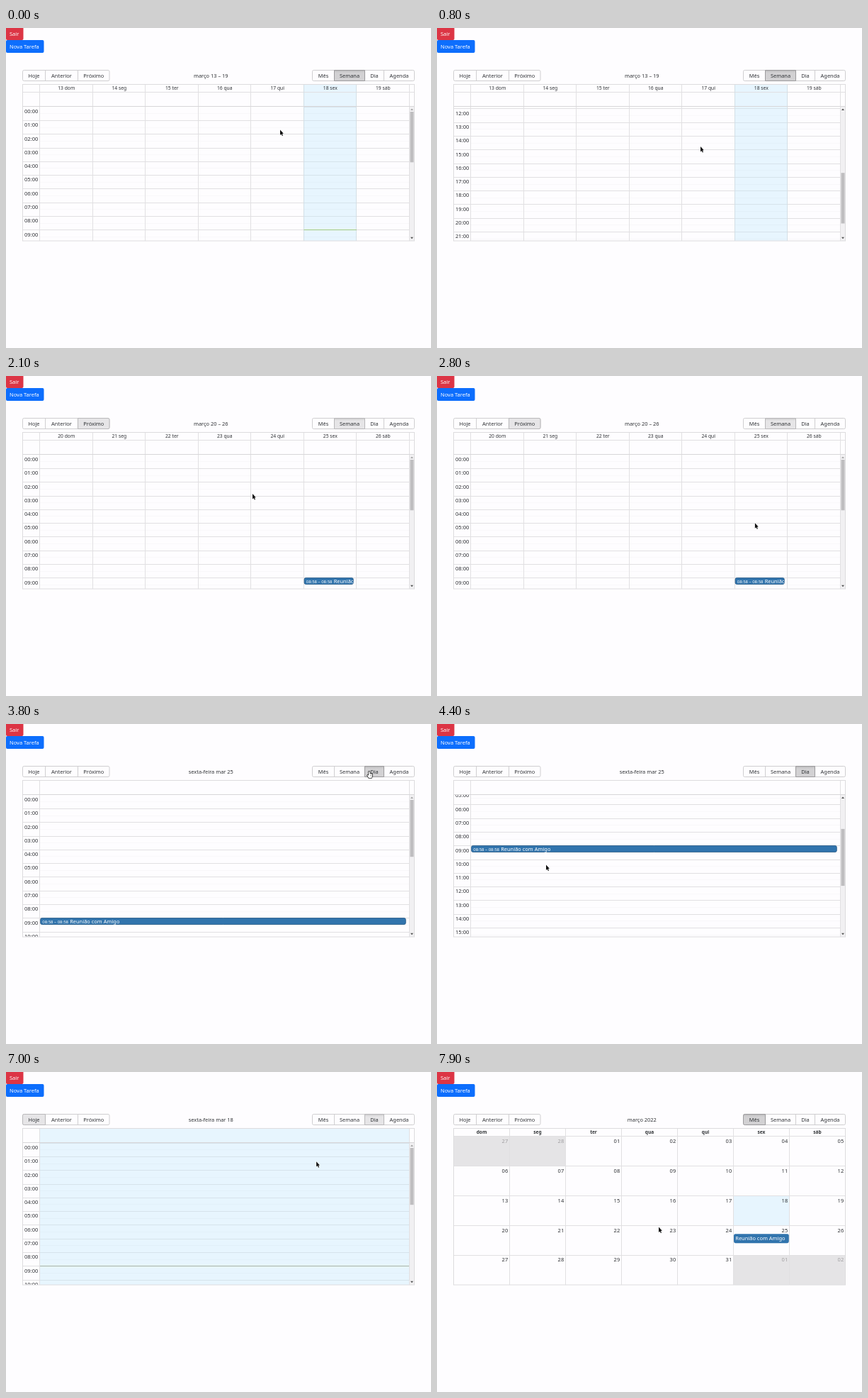
Write an HTML page with a canvas that moves like this. It is 600x451 px and loops after 8000 ms.

```html
<!DOCTYPE html>
<html lang="pt">
<head>
<meta charset="utf-8">
<title>Agenda</title>
<style>
html, body { margin: 0; width: 100%; height: 100%; overflow: hidden; background: #fefdff; }
canvas { display: block; width: 600px; height: 451px; }
</style>
</head>
<body>
<canvas id="stage"></canvas>
<script>
const W = 600, H = 451, LOOP = 8000, STEP = 100;
const FONT = '"Noto Sans", "Open Sans", sans-serif';
const BG = '#fefdff', LINE = '#e1e0e2', TINT = '#e7f5fe', INK = '#303336', BLUE = '#3174ad';
const LEFT = 23, GUTTER = 48, RIGHT = 569, BOTTOM = 300, HOUR = 19.28;
const DAYS = ['dom', 'seg', 'ter', 'qua', 'qui', 'sex', 'sáb'];
const NOW = 8.98;

const canvas = document.getElementById('stage');
const dpr = window.devicePixelRatio || 1;
canvas.width = Math.round(W * dpr);
canvas.height = Math.round(H * dpr);
const c = canvas.getContext('2d');

// Buttons: [label, left, right]
const NAV = [['Hoje', 23.5, 55.5], ['Anterior', 55.5, 101.5], ['Próximo', 101.5, 146]];
const VIEWS = [['Mês', 432.5, 463.5], ['Semana', 463.5, 506.5], ['Dia', 506.5, 533.5], ['Agenda', 533.5, 576.5]];

// Each scene: view, title, first day, focused button
const SCENES = [
  { at: 0, view: 'Semana', title: 'março 13 – 19', day: 13, focus: 'Semana' },
  { at: 1900, view: 'Semana', title: 'março 20 – 26', day: 20, focus: 'Próximo' },
  { at: 3700, view: 'Dia', title: 'sexta-feira mar 25', day: 25, focus: 'Dia' },
  { at: 5500, view: 'Dia', title: 'sexta-feira mar 18', day: 18, focus: 'Hoje' },
  { at: 7300, view: 'Mês', title: 'março 2022', day: 1, focus: 'Mês' }
];

// Keys: [time, ...values]
const POINTER = [
  [0, 387, 143.5], [800, 372, 167], [1400, 368, 164], [1800, 124, 67], [1900, 124, 67],
  [2100, 348, 166], [2600, 440, 228], [2900, 452, 200], [3500, 513, 67], [3800, 513, 67],
  [4200, 172, 190], [4400, 154, 198.5], [4900, 158, 222], [5400, 31, 66], [5700, 31, 66],
  [6200, 240, 170], [6700, 420, 235], [7200, 448, 67], [7300, 448, 67], [7900, 313, 218.5]
];
const SCROLL = [
  [0, 0], [100, 0], [800, 228.6], [1000, 273.7], [1100, 273.7], [1600, 0],
  [4000, 0], [4400, 102], [5499, 102], [5500, 0]
];

function along(keys, t) {
  let i = keys.findIndex(k => k[0] > t);
  if (i < 0) return keys[keys.length - 1].slice(1);
  const a = keys[i - 1], b = keys[i];
  const u = (t - a[0]) / (b[0] - a[0]), e = u * u * (3 - 2 * u);
  return a.slice(1).map((v, k) => v + (b[k + 1] - v) * e);
}

function rect(x, y, w, h, color) {
  c.fillStyle = color;
  c.fillRect(x, y, w, h);
}
const hline = (x0, x1, y, color = LINE) => rect(x0, Math.floor(y), x1 - x0, 1, color);
const vline = (x, y0, y1, color = LINE) => rect(Math.floor(x), y0, 1, y1 - y0, color);

function text(str, x, y, size = 7.45, color = INK, align = 'left', weight = 400) {
  c.font = `${weight} ${size}px ${FONT}`;
  c.textAlign = align;
  c.fillStyle = color;
  c.fillText(str, x, y);
}

function rounded(x, y, w, h, r, fill, stroke, width = 1) {
  c.beginPath();
  c.roundRect(x, y, w, h, r);
  if (fill) { c.fillStyle = fill; c.fill(); }
  if (stroke) { c.strokeStyle = stroke; c.lineWidth = width; c.stroke(); }
}

function clipped(x, y, w, h, draw) {
  c.save();
  c.beginPath();
  c.rect(x, y, w, h);
  c.clip();
  draw();
  c.restore();
}

function poly(points, fill, stroke, width) {
  c.beginPath();
  points.forEach(([x, y]) => c.lineTo(x, y));
  c.closePath();
  if (stroke) { c.strokeStyle = stroke; c.lineWidth = width; c.stroke(); }
  c.fillStyle = fill;
  c.fill();
}

const hovered = (list, p) => p[1] > 59 && p[1] < 75 && list.find(b => p[0] > b[1] && p[0] < b[2]);

function group(list, scene, p) {
  const x0 = list[0][1], x1 = list[list.length - 1][2], over = hovered(list, p);
  rounded(x0, 59.5, x1 - x0, 15, 2, BG, '#cfced0');
  list.slice(1).forEach(b => vline(b[1], 60, 74, '#cfced0'));
  list.forEach((b, i) => {
    const [label, l, r] = b;
    const active = label === scene.view, focus = label === scene.focus;
    if (active || focus || b === over) {
      const dark = active && (focus || b === over);
      const a = i ? 0 : 2, z = i === list.length - 1 ? 2 : 0;
      rounded(l, 59.5, r - l, 15, [a, z, z, a], dark ? '#d2d1d3' : '#e6e5e7', dark ? '#9c9b9d' : '#b9b8ba');
      if (active) {
        const g = c.createLinearGradient(0, 60, 0, 63);
        g.addColorStop(0, 'rgba(0,0,0,.1)');
        g.addColorStop(1, 'rgba(0,0,0,0)');
        rect(l + .5, 60, r - l - 1, 3, g);
      }
    }
    text(label, (l + r) / 2, 69.6, 7.45, INK, 'center');
  });
}

function page(scene, p) {
  rect(0, 0, W, H, BG);
  rounded(0, -2, 24.5, 19, 2, '#dc3545');
  text('Sair', 5, 10.7, 7.5, '#fff');
  rounded(0, 17, 53.5, 18, 2, '#0d6efd');
  text('Nova Tarefa', 5, 28.8, 7.5, '#fff');
  group(NAV, scene, p);
  group(VIEWS, scene, p);
  text(scene.title, 289.3, 69.6, 7.45, INK, 'center');
}

function frame() {
  c.strokeStyle = '#dddcde';
  c.lineWidth = 1;
  c.strokeRect(23.5, 79.5, 553, 220.5);
}

function meeting(x, y, w) {
  rounded(x + .4, y + .4, w - .8, 9, 2.2, BLUE, '#265985', .8);
  clipped(x, y, w - .5, 10, () => {
    text('08:58 – 08:58', x + 3, y + 7.8, 6, '#fff');
    text('Reunião com Amigo', x + 42, y + 8, 7.45, '#fff');
  });
}

function scrollbar(top, scroll) {
  const start = top + 7, track = 292.5 - start, total = HOUR * 24;
  rect(570, top, 6, BOTTOM - top, '#f1f0f2');
  rect(570.5, start + scroll / total * track, 5, (BOTTOM - top) / total * track, '#bfbec0');
  const y = top + 4;
  poly([[573, y - 1.5], [575, y + 1], [571, y + 1]], scroll > 0 ? '#505050' : '#a3a3a3');
  poly([[573, 297.2], [575, 294.8], [571, 294.8]], '#505050');
}

// Hour grid shared by the week and day views
function timeGrid(scene, scroll) {
  const week = scene.view === 'Semana';
  const count = week ? 7 : 1, top = week ? 111 : 100;
  const colW = (RIGHT + .5 - GUTTER) / count, origin = top + .2 - scroll;
  const todayCol = 18 - scene.day, hasToday = todayCol >= 0 && todayCol < count;
  const tx = GUTTER + todayCol * colW;
  const colX = i => Math.floor(GUTTER - .4 + i * colW);

  if (hasToday) rect(tx, 80, colW, BOTTOM - 80, TINT);
  if (week) {
    hline(LEFT, 576, 90);
    DAYS.forEach((d, i) => text(`${scene.day + i} ${d}`, GUTTER + (i + .5) * colW, 87.2, 6.75, INK, 'center'));
  }
  clipped(24, top, RIGHT - 24, BOTTOM - top, () => {
    for (let h = 0; h < 24; h++) {
      const y = origin + h * HOUR;
      if (h) hline(24, RIGHT, y);
      hline(GUTTER, RIGHT, y + HOUR / 2, 'rgba(0,0,0,.02)');
      if (hasToday) hline(tx, tx + colW, y, '#d6e3eb');
      text(String(h).padStart(2, '0') + ':00', 26, y + 8.8, 7.6);
    }
  });
  for (let i = 0; i <= count; i++) {
    vline(colX(i), 80, BOTTOM, hasToday && week && (i === todayCol || i === todayCol + 1) ? '#d3dfe6' : LINE);
  }
  clipped(24, top, RIGHT - 24, BOTTOM - top, () => {
    if (hasToday) hline(tx, Math.min(tx + colW, RIGHT), origin + NOW * HOUR, week ? '#a5cb80' : '#a9b5a3');
    const col = 25 - scene.day;
    if (col >= 0 && col < count) {
      meeting(GUTTER + col * colW + .2, origin + 8.967 * HOUR, week ? 70 : 516.5);
    }
  });
  hline(LEFT, 576, top - 1, '#d8d7d9');
  scrollbar(top, scroll);
  frame();
}

function month() {
  const colW = 79, rowH = 41.9, top = 90.5, x0 = 23.5;
  DAYS.forEach((d, i) => text(d, x0 + (i + .5) * colW, 87.2, 6.55, INK, 'center', 700));
  for (let n = 0; n < 35; n++) {
    const x = x0 + n % 7 * colW, y = top + Math.floor(n / 7) * rowH;
    const day = n - 1, off = day < 1 || day > 31;
    if (off) rect(x, y, colW, rowH, '#e5e4e6');
    if (day === 18) rect(x, y, colW, rowH, TINT);
    const shown = day < 1 ? day + 28 : day > 31 ? day - 31 : day;
    text(String(shown).padStart(2, '0'), x + colW - 2.3, y + 9.3, 7.5, off ? '#a09fa1' : INK, 'right');
  }
  for (let i = 1; i < 7; i++) vline(x0 + i * colW, 80, BOTTOM);
  for (let i = 0; i < 5; i++) hline(LEFT, 576, top + i * rowH);
  rounded(419, 228.2, 77.8, 13, 2.4, BLUE);
  text('Reunião com Amigo', 421.3, 237.4, 7.45, '#fff');
  frame();
}

function pointer(p) {
  c.save();
  c.lineJoin = 'round';
  c.translate(p[0], p[1]);
  if (hovered(NAV, p) || hovered(VIEWS, p)) {
    poly([[-1, 0], [.4, 0], [.6, 3], [4, 3.8], [4.3, 6], [3.2, 9], [-.8, 9], [-3, 5.6], [-2.2, 4.8], [-1, 5.8]],
      '#fff', '#222', 1.5);
    rect(1.6, 4.6, .5, 2, '#555');
    rect(2.8, 4.8, .5, 2, '#555');
  } else {
    poly([[0, 0], [0, 7.4], [1.7, 5.9], [2.8, 8.6], [4, 8.1], [2.9, 5.5], [4.8, 5.3]], '#111', '#fff', 1);
  }
  c.restore();
}

function draw(ms) {
  const t = Math.floor(ms % LOOP / STEP) * STEP;
  const scene = SCENES.filter(s => s.at <= t).pop();
  const p = along(POINTER, t);
  c.setTransform(dpr, 0, 0, dpr, 0, 0);
  page(scene, p);
  if (scene.view === 'Mês') month();
  else timeGrid(scene, along(SCROLL, t)[0]);
  pointer(p);
}

const began = performance.now();
function tick() {
  draw(performance.now() - began);
  requestAnimationFrame(tick);
}
tick();
</script>
</body>
</html>
```
